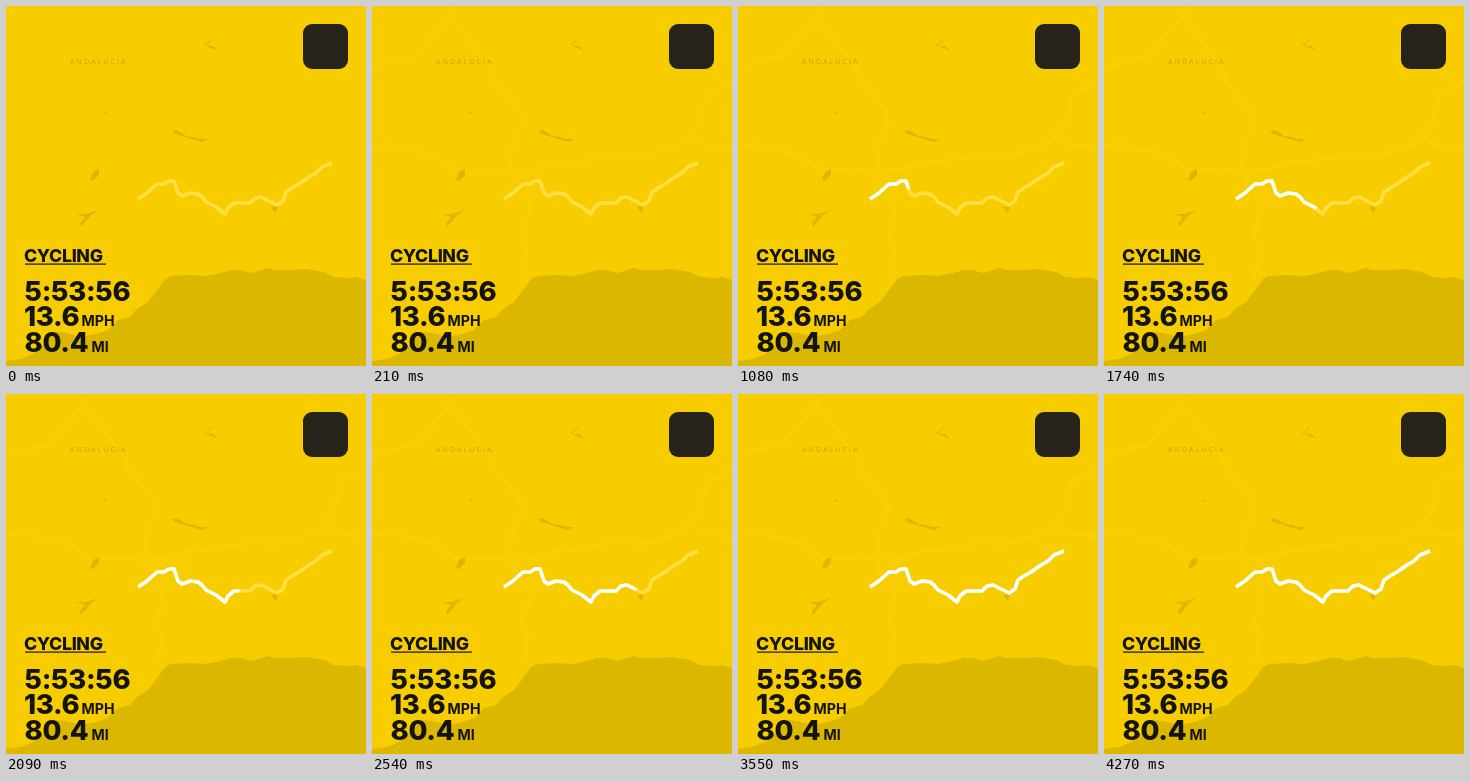
An HTML page for the animation above (5.1 s loop, 360x360 px).

```html
<!DOCTYPE html>
<html lang="en">
<head>
<meta charset="utf-8">
<title>Cycling route</title>
<style>
  html, body { margin: 0; width: 100%; height: 100%; overflow: hidden; background: #f8cd00; }
  svg { display: block; width: 100vw; height: 100vh; }
  text { font-family: Inter, sans-serif; font-weight: 800; fill: #14140f; }
  .stat { font-size: 27.5px; letter-spacing: -.3px; }
  .unit { font-size: 14.2px; font-weight: 700; }
  .place { font: 400 7.2px "Open Sans", sans-serif; letter-spacing: 2px; fill: #c5a20c; }
  .line { fill: none; stroke-linejoin: round; }
</style>
</head>
<body>
<svg viewBox="0 0 360 360">
  <rect width="360" height="360" fill="#f8cd00"/>

  <path fill="#dbb700" d="M360 274L350 271 342 272 328 271 318 266 300 263 285 264 268 264 262 262
    245 267 235 264 225 264 215 267 200 270 185 269 165 270 159 273 152 283 142 296 131 303 124 311 112 314
    102 324 90 328 75 331 60 327 50 326 38 338 27 348 15 353 0 355V360H360Z"/>

  <g id="roads" class="line" stroke="#fad116" stroke-width=".9">
    <path d="M83 0L77 11 63 28 53 40 44 50 20 56 0 63"/>
    <path d="M77 11L91 25 107 49 117 59 122 75 135 90 146 102 151 116 140 138 139 160 143 184"/>
    <path d="M0 141L19 137 34 143 60 148 85 165 108 163 139 166 165 163 185 157 214 154 240 149
      270 150 296 143 314 136 328 116 335 86 348 82 360 74"/>
    <path d="M314 126L330 138 360 143M156 187L157 208 150 228 156 244 151 270"/>
  </g>

  <g fill="#dcb702">
    <path d="M207 31L204 36 200 38 202 40 207 40 213 45 205 42 198 39 203 35Z"/>
    <path d="M166 125L170 124 176 127 180 130 188 131 194 133 202 133 196 136 186 133 176 130 169 128Z"/>
    <path d="M87 166L93 163 93 169 87 175 84 174Z"/>
    <path d="M70 208L79 208 93 204 85 209 81 214 75 221 74 217 79 211Z"/>
    <path d="M265 201L272 200 270 207 267 204Z"/>
    <path d="M97 107L99 105 101 108Z"/>
  </g>

  <text class="place" x="64" y="57.6">ANDALUCIA</text>

  <path id="ghost" class="line" stroke="#fedf45" stroke-width="3.6"
    d="M132 193L141 187 151 178 158 178 163 175 168 175 170 181 172 187 176 190 184 187 192 188
    196 191 200 196 210 201 219 208 222 202 228 197 244 197 249 192 255 191 263 195 271 199 277 195
    280 186 286 182 293 178 303 171 310 167 316 161 326 157"/>
  <path id="route" class="line" stroke="#fff" stroke-width="3.6"/>

  <rect x="297" y="18" width="45" height="45" rx="9" fill="#25231a"/>

  <text x="18" y="255.5" font-size="17.8" letter-spacing="-.35">CYCLING</text>
  <rect x="19" y="257.5" width="81" height="1.2" fill="#14140f"/>
  <text class="stat" x="18.5" y="295">5:53:56</text>
  <text class="stat" x="18" y="320">13.6</text>
  <text class="unit" x="75.5" y="320">MPH</text>
  <text class="stat" x="18.5" y="346">80.4</text>
  <text class="unit" x="85.5" y="345.6">MI</text>
</svg>
<script>
  const LOOP = 5100, STEP = 72.8, START = 445, END = 3560;
  const ghost = document.getElementById('ghost');
  const route = document.getElementById('route');
  const roads = document.getElementById('roads');
  const length = ghost.getTotalLength();
  const clamp = v => Math.min(1, Math.max(0, v));

  route.setAttribute('d', ghost.getAttribute('d'));

  function draw(now) {
    // The route advances in even steps at constant speed.
    const time = Math.floor((now % LOOP + 25) / STEP) * STEP;
    const drawn = clamp((time - START) / (END - START)) * length;
    route.style.strokeDasharray = `${drawn} ${length + 10}`;
    route.style.visibility = drawn > 0 ? 'visible' : 'hidden';
    roads.style.opacity = clamp(time / 500);
    requestAnimationFrame(() => draw(performance.now()));
  }
  draw(0);
</script>
</body>
</html>
```
